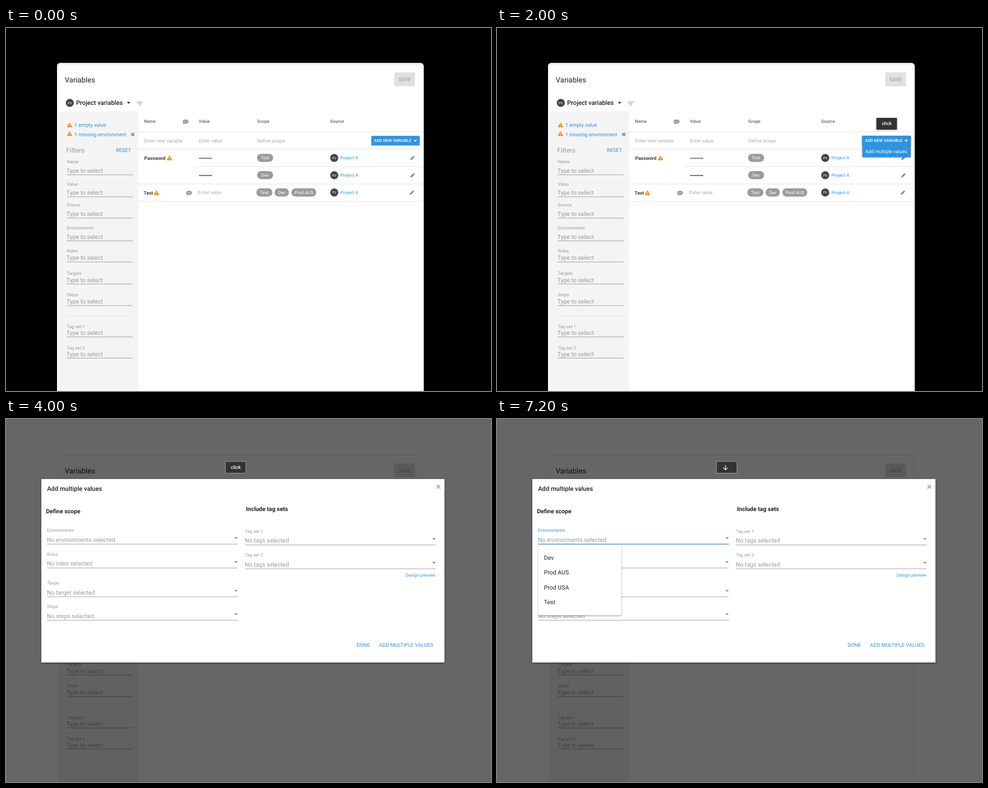
An HTML page for the animation above (8000 ms loop, 865 px wide and 647 px high).

```html
<!DOCTYPE html>
<html lang="en">
<head>
<meta charset="utf-8">
<title>Variables</title>
<style>
html, body { margin: 0; width: 100%; height: 100%; overflow: hidden; background: #000; }
svg { display: block; width: 865px; height: 647px; }
text { font-family: Roboto, sans-serif; text-rendering: geometricPrecision; white-space: pre; }
.s20 { font-size: 13.1px; } .s18 { font-size: 11.8px; } .s17 { font-size: 11.14px; }
.s16 { font-size: 10.49px; } .s14 { font-size: 9.18px; } .s13 { font-size: 8.52px; }
.s12 { font-size: 7.86px; } .s11 { font-size: 7.21px; } .s9 { font-size: 5.9px; }
.m { font-weight: 500; } .b { font-weight: 700; } .mid { text-anchor: middle; }
.ink { fill: #212121; } .mute { fill: #999; } .hint { fill: #a9a9a9; }
.blue { fill: #2f93e0; } .white { fill: #fff; } .head { fill: #666; }

/* one step per second, eight seconds in all */
.from1, .from2, .from3, .from4, .from5, .from6, .only2, .only3, .only4, .only5, .until4 {
  animation: 8s step-end infinite; visibility: hidden;
}
.from1 { animation-name: a1; } .from2 { animation-name: a2; }
.from3 { animation-name: a3; } .from4 { animation-name: a4; }
.from5 { animation-name: a5; } .from6 { animation-name: a6; }
.only2 { animation-name: o2; } .only3 { animation-name: o3; }
.only4 { animation-name: o4; } .only5 { animation-name: o5; }
.until4 { animation-name: u4; }
@keyframes a1 { 0% { visibility: hidden; } 12.5%, 100% { visibility: visible; } }
@keyframes a2 { 0% { visibility: hidden; } 25%, 100% { visibility: visible; } }
@keyframes a3 { 0% { visibility: hidden; } 37.5%, 100% { visibility: visible; } }
@keyframes a4 { 0% { visibility: hidden; } 50%, 100% { visibility: visible; } }
@keyframes a5 { 0% { visibility: hidden; } 62.5%, 100% { visibility: visible; } }
@keyframes a6 { 0% { visibility: hidden; } 75%, 100% { visibility: visible; } }
@keyframes o2 { 0%, 37.5%, 100% { visibility: hidden; } 25% { visibility: visible; } }
@keyframes o3 { 0%, 50%, 100% { visibility: hidden; } 37.5% { visibility: visible; } }
@keyframes o4 { 0%, 62.5%, 100% { visibility: hidden; } 50% { visibility: visible; } }
@keyframes o5 { 0%, 75%, 100% { visibility: hidden; } 62.5% { visibility: visible; } }
@keyframes u4 { 0% { visibility: visible; } 50%, 100% { visibility: hidden; } }
</style>
</head>
<body>
<svg id="stage" viewBox="0 0 865 647" xmlns="http://www.w3.org/2000/svg"></svg>
<script>
const text = (x, y, cls, str) => `<text x="${x}" y="${y}" class="${cls}">${str}</text>`;
const rect = (x, y, w, h, fill, more = '') =>
  `<rect x="${x}" y="${y}" width="${w}" height="${h}" fill="${fill}" ${more}/>`;
const line = (x1, x2, y, color, w = 0.8) =>
  `<path d="M${x1} ${y}H${x2}" stroke="${color}" stroke-width="${w}"/>`;
const group = (cls, ...parts) => `<g class="${cls}">${parts.join('')}</g>`;
const use = (id, x, y) => `<use href="#${id}" x="${x}" y="${y}"/>`;
const caret = (x, y, fill) => `<path d="M${x} ${y}h6.4l-3.2 3.3z" fill="${fill}"/>`;

const badge = (x, y) =>
  `<circle cx="${x}" cy="${y}" r="7.2" fill="#444"/>` + text(x, y + 2.1, 's9 white mid', 'PV');
const pill = (x, y, w, str) =>
  rect(x, y, w, 14.6, '#9b9b9b', 'rx="7.3"') + text(x + w / 2, y + 10.1, 's12 white mid', str);
const dots = (x, y) => Array.from({ length: 8 }, (_, i) =>
  `<circle cx="${x + i * 2.9}" cy="${y}" r="1.05" fill="#212121"/>`).join('');
const project = (y, penX) =>
  badge(585.4, y) + text(596.6, y + 2.4, 's12 blue', 'Project A') + use('pen', penX, y);
const filter = ([name, labelY, y]) =>
  text(108.6, labelY, 's12 mute', name) + text(107.8, y, 's16 mute', 'Type to select') +
  line(108, 226, y + 3.8, '#8f8f8f');
const field = (x, labelY, name, value) =>
  text(x, labelY, 's12 mute', name) + text(x, labelY + 17.6, 's16 mute', value) +
  line(x, x + 340.5, labelY + 21.8, '#8f8f8f') + caret(x + 334.1, labelY + 9.6, '#8a8a8a');
const tip = (x, y, border) =>
  rect(x, y, 36.6, 20.8, '#333', border ? 'stroke="#aaa" stroke-width=".8"' : 'filter="url(#soft)"');

const defs = `<defs>
  <filter id="soft" x="-20%" y="-40%" width="140%" height="200%">
    <feDropShadow dx="0" dy="1" stdDeviation="1.1" flood-opacity=".45"/></filter>
  <filter id="deep" x="-5%" y="-5%" width="110%" height="112%">
    <feDropShadow dx="0" dy="1" stdDeviation="1.6" flood-opacity=".5"/></filter>
  <g id="warn"><path d="M0 -3.9L4.3 3.6H-4.3z" fill="#ff8d0f" stroke="#ff8d0f" stroke-width=".9" stroke-linejoin="round"/>
    <path d="M0 -1.4V1.1M0 1.9V2.9" stroke="#fff" stroke-width="1"/></g>
  <g id="note"><path d="M-4 1.5L-4.6 4.8L0 3z" fill="#999"/><ellipse rx="5.3" ry="3.9" fill="#999"/>
    <path d="M-3 0h1.2M-.6 0h1.2M1.8 0h1.2" stroke="#fff" stroke-width="1.2"/></g>
  <g id="pen" fill="#8a8a8a"><path d="M-3.7 3.7V1.6L1.3 -3.4L3.4 -1.3L-1.6 3.7z"/>
    <path d="M1.8 -3.9L2.3 -4.4L4.3 -2.4L3.8 -1.9z"/></g>
</defs>`;

const page = [
  rect(91, 62.3, 654, 600, '#fff', 'rx="5.5"'),
  rect(93.9, 64.5, 648.6, 600, '#fff', 'rx="1.5" stroke="#e6e8ec" stroke-width="1"'),
  text(104.8, 97, 's20 ink', 'Variables'),
  rect(692.6, 79.2, 36.8, 24.6, '#e0e0e0'),
  text(711, 94.6, 's14 mute mid', 'SAVE'),
  badge(113.8, 133.5),
  text(125, 137.2, 's17 ink m', 'Project variables'),
  caret(215.5, 131.8, '#212121'),
  line(233.2, 243.6, 132, '#8a8a8a', 1), line(235, 241.9, 134.9, '#8a8a8a', 1),
  line(236.9, 240, 137.7, '#8a8a8a', 1),

  rect(94.4, 148.5, 141.6, 500, '#f4f4f4'),
  use('warn', 113.3, 172.9), text(121.8, 176.2, 's14 blue', '1 empty value'),
  use('warn', 113.3, 188.4), text(121.8, 192.6, 's14 blue', '1 missing environment'),
  '<path d="M223.4 187l5.4 5.4M228.8 187l-5.4 5.4" stroke="#8a8a8a" stroke-width="2"/>',
  text(107.6, 222, 's18 mute', 'Filters'), text(196, 221.4, 's14 blue', 'RESET'),
  ...[['Name', 241.2, 257.9], ['Value', 280.6, 297.1], ['Source', 318.4, 335.1],
    ['Environments', 359, 375.6], ['Roles', 400.4, 413.3], ['Targets', 440.1, 452.5],
    ['Steps', 478.3, 491], ['Tag set 1', 534.7, 546.9], ['Tag set 2', 572.7, 584.5]].map(filter),
  line(108, 226, 513, '#e0e0e0'),

  ...[184.8, 216, 278, 308.8].map(y => line(236, 742, y, '#dcdcdc')),
  line(332.5, 742, 247.3, '#dcdcdc'),
  text(246, 169, 's12 head m', 'Name'), use('note', 320.3, 166.8),
  text(343.8, 169, 's12 head m', 'Value'), text(447.8, 169, 's12 head m', 'Scope'),
  text(578, 168.6, 's12 head m', 'Source'),
  text(246.4, 203.9, 's13 hint', 'Enter new variable'),
  text(344, 203.9, 's13 hint', 'Enter value'), text(448, 203.9, 's13 hint', 'Define scope'),
  text(246.6, 235.1, 's13 ink m', 'Password'), use('warn', 291.4, 231.7),
  dots(346, 232.2), pill(447.8, 224.2, 28.6, 'Test'), project(231.6, 725),
  dots(346, 262.9), pill(447.8, 254.9, 28.6, 'Dev'), project(262.5, 725),
  text(245.6, 297, 's13 ink m', 'Text'), use('warn', 268.4, 293.7), use('note', 326.6, 293.8),
  text(342.8, 296.2, 's13 hint', 'Enter value'),
  pill(446.4, 285.8, 28.8, 'Test'), pill(479, 285.8, 25.6, 'Dev'), pill(509, 285.8, 44.4, 'Prod AUS'),
  project(293.2, 724),

  group('from1', rect(651.5, 192.2, 86.4, 17.2, '#2f93e0', 'filter="url(#soft)"')),
  group('from2', rect(651.5, 192.2, 86.4, 37.8, '#2f93e0', 'filter="url(#soft)"')),
  group('from3', rect(651.5, 209.2, 86.4, 20.8, '#0f7ad4')),
  rect(651.5, 192.2, 86.4, 17.2, '#2f93e0'),
  text(656.6, 203.2, 's11 white m', 'ADD NEW VARIABLE'), caret(726.8, 199.4, '#fff'),
  group('from2', text(657, 222.9, 's13 white', 'Add multiple values')),
  group('only2', tip(676.7, 160.2), text(695, 173.1, 's13 white m mid', 'click')),
  group('only3', tip(676.7, 160.2), text(695, 173.1, 's13 white m mid', 'hover')),
];

const dialog = [
  rect(0, 0, 865, 647, '#000', 'opacity=".6"'),
  rect(63, 107, 719, 327, '#fff', 'filter="url(#deep)"'),
  text(73.2, 127.8, 's17 ink m', 'Add multiple values'),
  '<path d="M767.8 117.2l6.8 6.8M774.6 117.2l-6.8 6.8" stroke="#888" stroke-width="1.1"/>',
  text(71.2, 167.8, 's16 ink b', 'Define scope'), text(428, 163.8, 's16 ink b', 'Include tag sets'),
  field(73, 201.2, 'Environments', 'No environments selected'),
  field(73, 243.8, 'Roles', 'No roles selected'),
  field(73, 295.1, 'Target', 'No target selected'),
  field(73, 336.9, 'Steps', 'No steps selected'),
  field(426, 202.7, 'Tag set 1', 'No tags selected'),
  field(426, 245.2, 'Tag set 2', 'No tags selected'),
  text(712.8, 280.5, 's12 blue', 'Design preview'),
  text(625.2, 405.5, 's14 blue', 'DONE'), text(665.2, 405.5, 's14 blue', 'ADD MULTIPLE VALUES'),
  tip(391.3, 75.8, true),
  group('only4', text(409.8, 88.7, 's13 white m mid', 'click')),
  group('only5', text(409.8, 88.7, 's13 white m mid', 'select')),
  group('from5',
    rect(72.5, 193, 60, 11, '#fff'), text(73, 201.2, 's12 blue', 'Environments'),
    line(73, 413.5, 223, '#2f93e0', 1)),
  group('from6',
    '<path d="M407.5 82v8.6M403.4 86.6l4.1 4.1l4.1 -4.1" fill="none" stroke="#fff" stroke-width="1.1"/>',
    rect(73.2, 224.4, 148.8, 125.4, '#fff', 'filter="url(#soft)"'),
    ...['Dev', 'Prod AUS', 'Prod USA', 'Test'].map((s, i) => text(83.8, 251.2 + i * 26.2, 's16 ink', s))),
];

document.getElementById('stage').innerHTML = defs +
  rect(0, 0, 865, 647, '#fff') +
  group('until4', rect(0, 0, 865, 647, '#000')) +
  group('', ...page) + group('from4', ...dialog);
</script>
</body>
</html>
```
